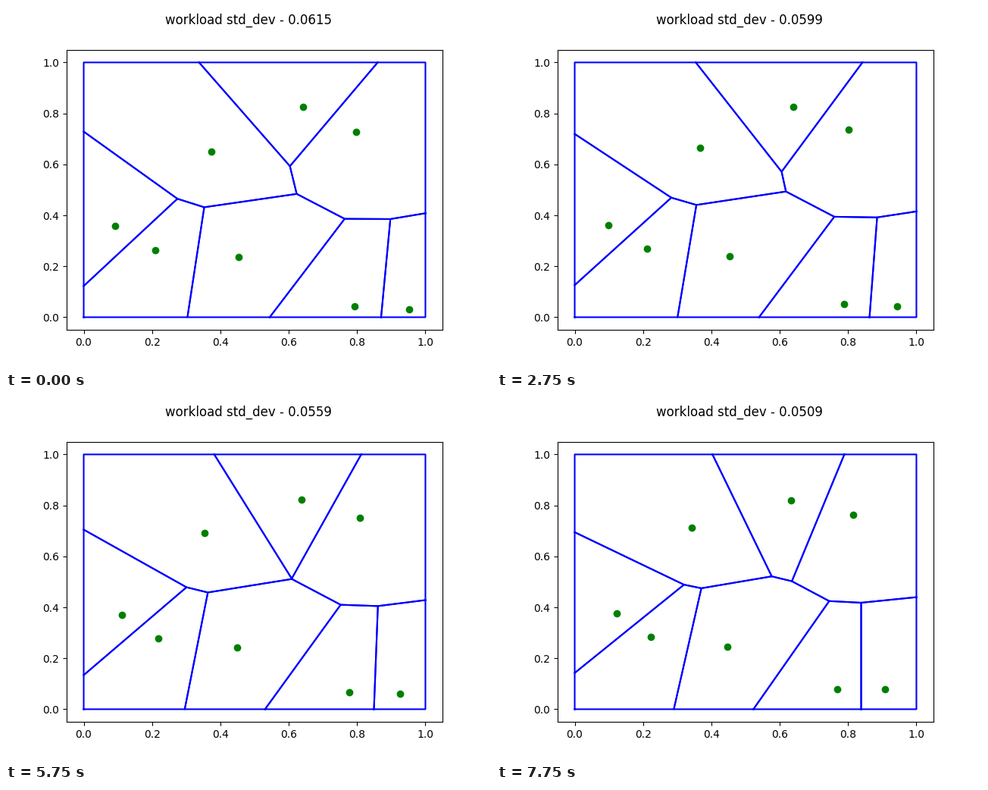
Recreate the animation shown at these times as a matplotlib script. Size 640 by 480 pixels, loop 8000 ms.

```python
import numpy as np
import matplotlib.pyplot as plt
from matplotlib.animation import FuncAnimation

FRAMES = 32

SQUARE = np.array([(0, 0), (0, 1), (1, 1), (1, 0)], float)

# Each site drifts along a straight line from START to END
START = np.array([(0.0919, 0.3578), (0.2095, 0.2636), (0.4544, 0.2357),
                  (0.3740, 0.6513), (0.6422, 0.8265), (0.7977, 0.7284),
                  (0.7928, 0.0435), (0.9531, 0.0322)])
END = np.array([(0.1239, 0.3758), (0.2228, 0.2845), (0.4474, 0.2464),
                (0.3415, 0.7139), (0.6338, 0.8199), (0.8159, 0.7637),
                (0.7684, 0.0786), (0.9081, 0.0786)])


def sites_at(u):
    return START + (END - START) * u * (0.4 + 0.6 * u)


def std_dev_at(u):
    return 0.06146 - 0.0106 * u * (0.335 + 0.665 * u * u)


def clip(polygon, site, other):
    """Keep the part of the polygon that is nearer to site than to other."""
    side = (polygon - (site + other) / 2) @ (site - other)
    kept = []
    for i, p in enumerate(polygon):
        j = (i + 1) % len(polygon)
        if side[i] >= 0:
            kept.append(p)
        if side[i] * side[j] < 0:
            t = side[i] / (side[i] - side[j])
            kept.append(p + t * (polygon[j] - p))
    return np.array(kept)


def cell(sites, k):
    """Closed outline of the Voronoi cell of site k inside the square."""
    polygon = SQUARE
    for i, other in enumerate(sites):
        if i != k:
            polygon = clip(polygon, sites[k], other)
    return np.vstack([polygon, polygon[:1]])


fig, ax = plt.subplots(figsize=(6.4, 4.8), dpi=100)
ax.set_xlim(-0.05, 1.05)
ax.set_ylim(-0.05, 1.05)
title = fig.suptitle("")
outlines = [ax.plot([], [], "b-")[0] for _ in START]
dots, = ax.plot([], [], "go")


def update(n):
    u = n / (FRAMES - 1)
    sites = sites_at(u)
    for k, outline in enumerate(outlines):
        outline.set_data(*cell(sites, k).T)
    dots.set_data(*sites.T)
    title.set_text(f"workload std_dev - {std_dev_at(u):.4f}")
    return [*outlines, dots, title]


anim = FuncAnimation(fig, update, frames=FRAMES, interval=250, repeat=True)
plt.show()
```
